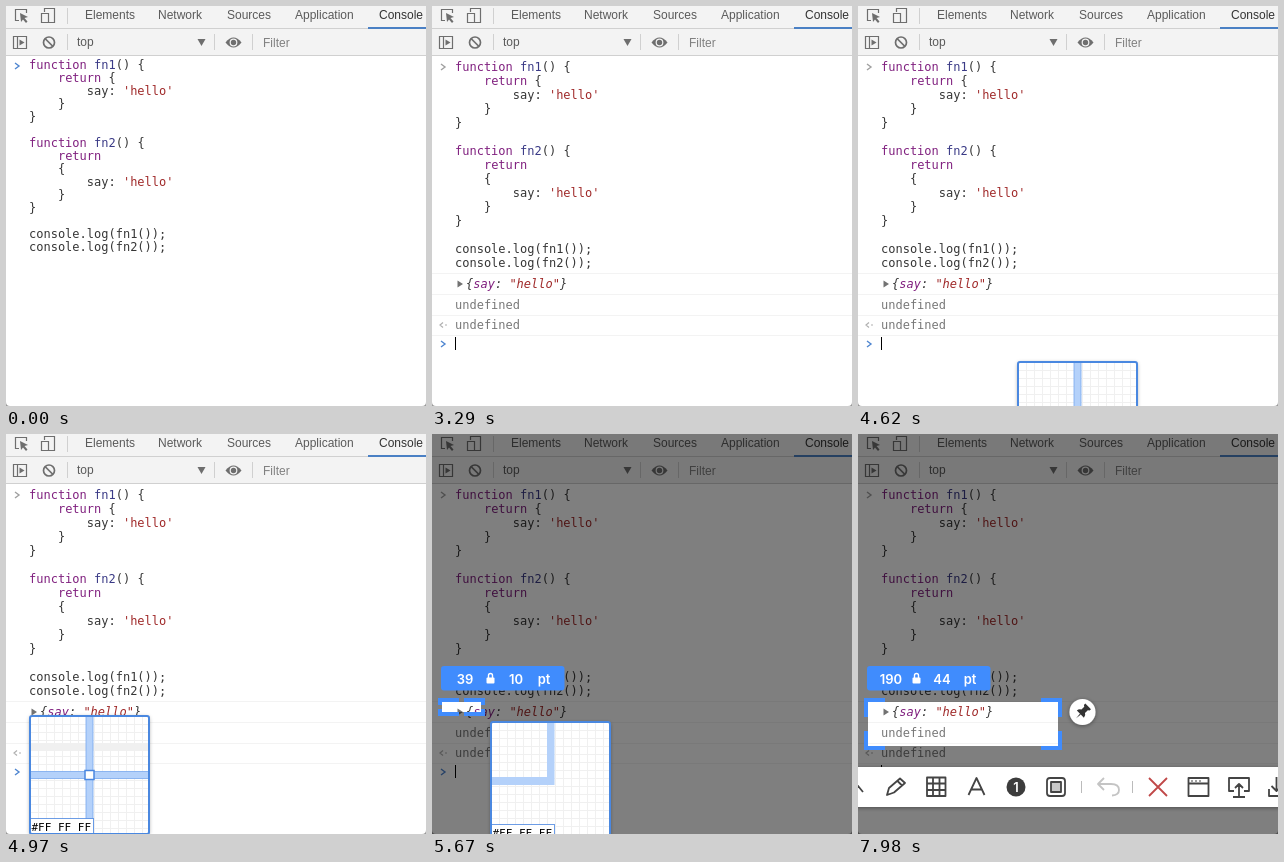
An HTML page that plays this animation: 420x400 px, repeating every 8000 ms.

```html
<!DOCTYPE html>
<html lang="en">
<head>
<meta charset="utf-8">
<title>Console screenshot</title>
<style>
  html, body { margin: 0; height: 100%; overflow: hidden; background: #fff; }
  svg { display: block; overflow: hidden; }
  text { white-space: pre; }
  .ui { font: 12px "Liberation Sans", Arial, sans-serif; fill: #5a5a5a; }
  .mono { font: 12px "DejaVu Sans Mono", Menlo, monospace; fill: #363636; }
  .size { font: 600 13px Inter, sans-serif; fill: #fff; text-anchor: middle; }
  .key { fill: #80207f; }
  .def { fill: #3a3a86; }
  .str { fill: #a02a2a; }
  .gray { fill: #787878; }
  .line { fill: none; stroke: #6e6e6e; stroke-width: 1.2; }
  .tool { fill: none; stroke: #444; stroke-width: 1.8; stroke-linejoin: round; }
  .chevron { fill: none; stroke: #4f86d0; stroke-width: 1.4; }
</style>
</head>
<body>
<svg id="stage" width="420" height="400" viewBox="0 0 420 400">
  <defs>
    <pattern id="grid" width="8" height="8" patternUnits="userSpaceOnUse">
      <path d="M0 .5H8M.5 0V8" stroke="#f0f0f0" />
    </pattern>
    <filter id="shadow" x="-20%" y="-20%" width="140%" height="140%">
      <feDropShadow dx="0" dy="1" stdDeviation="2" flood-opacity=".4" />
    </filter>
  </defs>

  <!-- developer tools header -->
  <rect width="420" height="49" fill="#f3f3f3" />
  <path d="M0 22.5H420M0 49.5H420M61.5 2V18M61.5 28V44M208.5 28V44M246.5 28V44" stroke="#d0d0d0" />
  <path d="M362 22H420" stroke="#4a80c4" stroke-width="2" />
  <g class="line">
    <path d="M13 14.5H9.5V3.5H20.5V7" />
    <path d="M14 7L22 11L18.5 12L21.5 15.5L20 17L17 13.5L15 16Z" fill="#6e6e6e" stroke="none" />
    <path d="M38.5 6V2.500H48.5V16.5H43M35.5 7.5H42.5V16.5H35.5Z" />
    <path d="M7.5 30.5H20.5V42.5H7.5ZM11.5 30.5V42.5" />
    <path d="M13.5 33.5L18.5 36.5L13.5 39.5Z" fill="#6e6e6e" stroke="none" />
    <circle cx="43" cy="36.5" r="5.5" stroke-width="1.7" />
    <path d="M39 32.5L47 40.5" stroke-width="1.7" />
    <path d="M219.5 36.5Q227.5 26.5 235.5 36.5Q227.5 46.5 219.5 36.5Z" fill="#6e6e6e" stroke="none" />
    <circle cx="227.5" cy="36.5" r="3.3" fill="#6e6e6e" stroke="#f3f3f3" />
  </g>
  <path d="M191.5 33H199.5L195.5 40Z" fill="#6e6e6e" />
  <g class="ui">
    <text x="79" y="13">Elements</text>
    <text x="152" y="13">Network</text>
    <text x="221" y="13">Sources</text>
    <text x="289" y="13">Application</text>
    <text x="373" y="13" style="fill:#333">Console</text>
    <text x="71" y="40">top</text>
    <text x="257" y="41" style="fill:#808080">Filter</text>
  </g>

  <!-- console -->
  <g id="code" class="mono"></g>
  <path id="inputMark" class="chevron" />
  <g id="results" class="mono">
    <path d="M0 267.5H420M0 288.5H420M0 309.5H420M0 329.5H420" stroke="#f3f3f3" />
    <path d="M25.5 274.5L31 278L25.5 281.5Z" fill="#727272" />
    <text x="34" y="282" font-style="italic">{<tspan class="key">say</tspan>: <tspan class="str">"hello"</tspan>}</text>
    <text x="23" y="303" class="gray">undefined</text>
    <text x="23" y="323" class="gray">undefined</text>
    <path d="M11 316.5L8 319L11 321.5M13 319H15" fill="none" stroke="#b0b0b0" stroke-width="1.2" />
    <path class="chevron" d="M9 335L13 338L9 341" />
  </g>
  <rect id="caret" width="1" height="13" />
  <path d="M0 396V400H4Q0 400 0 396ZM420 396V400H416Q420 400 420 396Z" fill="#999" />

  <!-- screen capture tool -->
  <path id="dim" fill-rule="evenodd" opacity=".5" />
  <path id="corners" fill="none" stroke="#408cfd" stroke-width="4" />
  <g id="sizeLabel">
    <rect x="9" y="-36" width="123.5" height="24.500" rx="3" fill="#408cfd" />
    <g class="size">
      <text id="widthText" x="33" y="-18.5"></text>
      <text id="heightText" x="84" y="-18.5"></text>
      <text x="112" y="-18.5">pt</text>
    </g>
    <rect x="54.5" y="-24.5" width="8" height="6" rx="1" fill="#fff" />
    <path d="M56.5 -24V-26.5A2 2 0 0 1 60.5 -26.5V-24" fill="none" stroke="#fff" stroke-width="1.4" />
  </g>
  <g id="magnifier">
    <rect width="119" height="118" rx="2" fill="#fff" filter="url(#shadow)" />
    <svg width="119" height="118">
      <g id="bands" fill="#f0f0f0"></g>
      <rect width="119" height="118" fill="url(#grid)" />
      <path id="cross" stroke="#78a8ee" fill="#b4d1fa" stroke-width=".8" />
      <rect id="pixel" x="55" y="54.5" width="9" height="9" fill="#fff" stroke="#4a86e0" stroke-width="1.5" />
      <rect x="0" y="102.5" width="63.5" height="17" fill="#fff" stroke="#4a86e0" stroke-width=".8" />
      <text class="mono" x="1.5" y="115" style="font-size:11px;fill:#000">#FF FF FF</text>
    </svg>
    <rect width="119" height="118" rx="2" fill="none" stroke="#4a88e0" stroke-width="2" />
  </g>
  <g id="tools">
    <circle cx="224.5" cy="278" r="13" fill="#fff" filter="url(#shadow)" />
    <g transform="translate(224.5 278) rotate(45)" fill="#333">
      <path d="M-4 -8H4V-6L2.500 -5V-1Q5 0 5 3H-5Q-5 0 -2.500 -1V-5L-4 -6Z" />
      <path d="M-.7 3H.7L0 9Z" />
    </g>
    <rect x="-5" y="333" width="430" height="40" fill="#fff" filter="url(#shadow)" />
    <g class="tool">
      <path d="M-4 347L5 358" />
      <path d="M29 361L31 354L42 344.5L47 349L36 358.5ZM39.5 347L44 351.5" />
      <path d="M69 343.5H87.5V362H69ZM75 343.5V362M81.5 343.5V362M69 349.5H87.5M69 356H87.5" />
      <path d="M110.5 361L118.5 344L126.5 361M113.5 355.5H123.5" />
      <rect x="189" y="344" width="18" height="18" rx="3" />
      <rect x="193" y="348" width="10" height="10" fill="#c8c8c8" />
      <path d="M223.5 347V359M274.5 347V359" stroke="#bbb" stroke-width="1" />
      <path d="M246 344L240 350L246 356M241 350H253Q261 350 261 356Q261 361 254 361.5" stroke="#c4c4c4" />
      <path d="M291 344L309 362M309 344L291 362" stroke="#c04848" />
      <path d="M330.5 344H350.5V362H330.5ZM330.5 349.5H350.5" />
      <path d="M333 347H335M337 347H339M341 347H343" stroke-width="1.2" />
      <path d="M376 357H371V344H391V357H386M381 363V350M377 354L381 350L385 354M375 363H387" />
      <path d="M411 355V362H426M418.5 343V357M413.5 352L418.5 357L423.5 352" />
    </g>
    <circle cx="158" cy="353" r="9.5" fill="#3c3c3c" />
    <text class="size" x="158" y="357.5">1</text>
  </g>
</svg>

<script>
const $ = id => document.getElementById(id);
const show = (id, on) => { $(id).style.display = on ? "" : "none"; };
const set = (id, attrs) => {
  for (const name in attrs) $(id).setAttribute(name, attrs[name]);
};
const progress = (t, from, to) => Math.min(1, Math.max(0, (t - from) / (to - from)));
const easeOut = p => 1 - (1 - p) ** 3;
const easeInOut = p => p * p * (3 - 2 * p);
const mix = (a, b, p) => a.map((v, i) => v + (b[i] - v) * p);

const LOOP = 8000, BLINK = 560;
const ENTER = 2100, RESULTS = 2170;
const CAPTURE = 4410, HOVER = 4620, PRESS = 5290, DRAG = 5390, DROP = 6370, RELEASE = 6440, TOOLS = 6580;

const source = `function fn1() {
    return {
        say: 'hello'
    }
}

function fn2() {
    return
    {
        say: 'hello'
    }
}

console.log(fn1());
console.log(fn2());`;

$("code").innerHTML = source.split("\n").map(line => `<text x="23">${line
  .replace(/fn\d(?=\(\) {)/, '<tspan class="def">$&</tspan>')
  .replace(/function|return/, '<tspan class="key">$&</tspan>')
  .replace(/'hello'/, '<tspan class="str">$&</tspan>')}</text>`).join("");

function drawConsole(t) {
  const entered = t >= ENTER;
  const top = entered ? 65 : 63, lineHeight = entered ? 14 : 13;
  [...$("code").children].forEach((line, i) => line.setAttribute("y", top + i * lineHeight));
  const y = entered ? 61 : 60;
  set("inputMark", { d: `M9 ${y - 3}L13 ${y}L9 ${y + 3}` });
  $("inputMark").style.stroke = entered ? "#a0a0a0" : "";
  show("results", t >= RESULTS);

  const start = entered ? RESULTS : 770;
  const lit = t >= CAPTURE || (t >= start && Math.floor((t - start) / BLINK) % 2 === 0);
  show("caret", lit);
  set("caret", entered ? { x: 23, y: 331 } : { x: 160, y: 235 });
}

const dragProgress = t => easeInOut(progress(t, DRAG, DROP));

function pointerAt(t) {
  if (t < 4970) return mix([250, 400], [13, 271], easeOut(progress(t, HOVER - 70, 4970)));
  if (t < 5320) return mix([13, 271], [10, 266], progress(t, 4970, 5250));
  if (t < DRAG) return mix([10, 266], [10, 268], progress(t, 5320, DRAG));
  return mix([10, 268], [200, 314], dragProgress(t));
}

function drawMagnifier(t) {
  const [px, py] = pointerAt(t).map(Math.round);
  const dragging = t > DRAG;
  show("magnifier", t >= HOVER && t < RELEASE);
  set("magnifier", { transform: `translate(${px + 11} ${py + 11})` });
  $("bands").innerHTML = [267.5, 288.5, 309.5, 329.5].map(y =>
    `<rect y="${55 + (y - py) * 8}" width="119" height="8" />`).join("");
  set("cross", {
    d: dragging ? "M-1 55H56V-1H63.5V63H-1Z" : "M-1 55.5H56V-1H63V55.5H121V62.5H63V121H56V62.5H-1Z",
    "stroke-width": dragging ? 0 : 0.8
  });
  show("pixel", !dragging);
}

function drawSelection(t) {
  const pressed = t >= PRESS, released = t >= RELEASE;
  const drag = dragProgress(t);
  const [x, y] = pointerAt(Math.min(t, DRAG)).map(Math.round);
  const w = released ? 190 : Math.round(1 + 190 * drag);
  const h = released ? 44 : Math.round(1 + 44 * drag);
  const hole = pressed ? `M${x} ${y}h${w}v${h}h${-w}Z` : "";
  show("dim", (t >= CAPTURE && t < HOVER) || pressed);
  set("dim", { d: "M0 0H420V400H0Z" + hole });

  show("sizeLabel", pressed);
  set("sizeLabel", { transform: `translate(0 ${y})` });
  $("widthText").textContent = w;
  $("heightText").textContent = h;

  show("corners", pressed);
  const l = x - 2, u = y - 2, r = x + w + 2, b = y + h + 2;
  const dx = Math.min(19, w / 2), dy = Math.min(17, h / 2);
  set("corners", w < 6 ? { d: `M${x} ${y + 0.5}h1`, "stroke-width": 1 } : {
    d: `M${l} ${u + dy}V${u}h${dx}M${r - dx} ${u}H${r}v${dy}` +
       `M${r} ${b - dy}V${b}h${-dx}M${l + dx} ${b}H${l}v${-dy}`,
    "stroke-width": 4
  });
}

function draw() {
  const t = performance.now() % LOOP;
  drawConsole(t);
  drawSelection(t);
  drawMagnifier(t);
  set("tools", { opacity: progress(t, TOOLS - 70, 6930) });
  requestAnimationFrame(draw);
}
draw();
</script>
</body>
</html>
```
